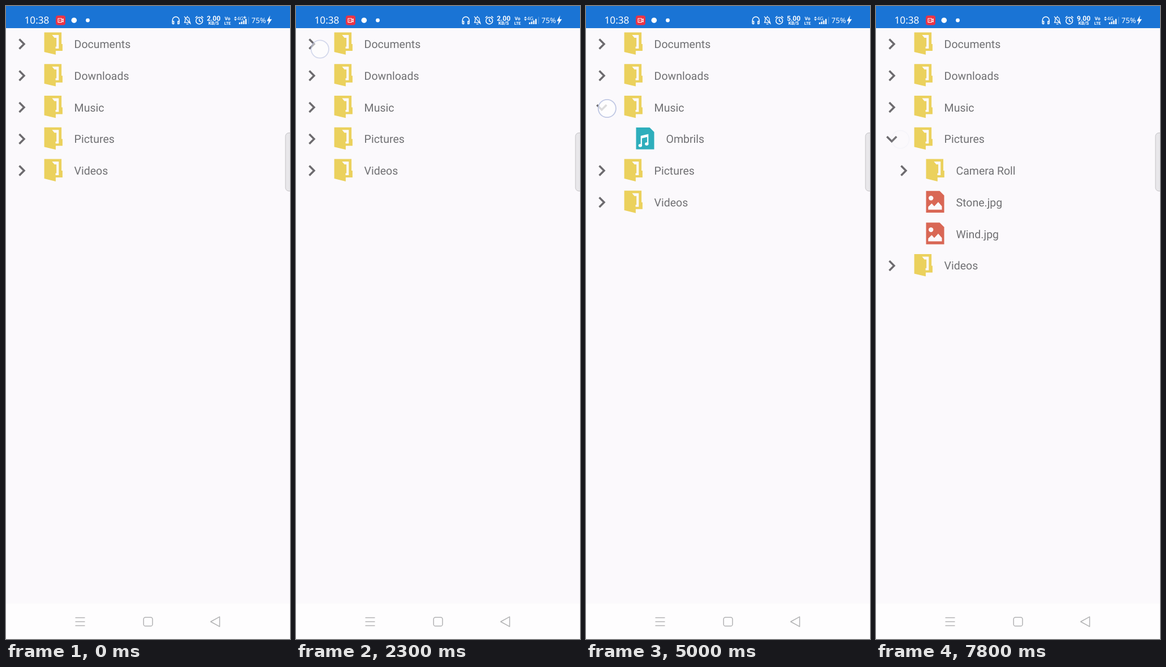
These frames come from a looping animation (502x1115 px, 8 s). An HTML page:

```html
<!DOCTYPE html>
<html lang="en">
<head>
<meta charset="utf-8">
<title>File tree</title>
<style>
  html, body { margin: 0; width: 100%; height: 100%; overflow: hidden; background: #fbf9fc; }
  svg { display: block; }
  text { font-family: Roboto, sans-serif; text-rendering: geometricPrecision; }
  .label { font-size: 19.52px; fill: #707073; }
  .bar text { fill: #fff; font-family: "Noto Sans", sans-serif; }
  .bar .small { font-family: Roboto, sans-serif; font-weight: 700; text-anchor: middle; }
  .line { fill: none; stroke: #fff; stroke-width: 1.5; stroke-linecap: round; stroke-linejoin: round; }
  .nav { fill: none; stroke: #b2b2b4; stroke-width: 1.5; stroke-linejoin: round; }
  .chevron { fill: none; stroke: #6d6b6f; stroke-width: 3.5; }
</style>
</head>
<body>
<svg width="502" height="1115" viewBox="0 0 502 1115">
  <defs>
    <g id="folder">
      <path fill="#ebd15d" d="M0-20.5H30.5V0H32.3V12H20.3V18.8L0 14Z"/>
      <path fill="#fbf9fc" d="M13.8-16H25.7V8H20V4.4H21.6V-11H18Z"/>
    </g>
    <path id="page" d="M0-20.2H24L32-12.2V18.2H0Z"/>
    <circle id="dot" cx="15.5" cy="4.5" r="7.5" fill="#fff"/>
    <g id="image" fill="#fbf9fc">
      <circle cx="8.7" cy="-7.5" r="4.2"/>
      <path d="M3.8 13V8L10 2L14.5 7L21.5-.5L28 7V13Z"/>
    </g>
    <g id="note" fill="#fff">
      <path d="M8.2-5.6L21.8-8.8V9H19.6V-3.6L10.4-1.4V12H8.2Z"/>
      <ellipse cx="7.4" cy="11.5" rx="3.2" ry="2.7"/>
      <ellipse cx="18.8" cy="8.7" rx="3.2" ry="2.7"/>
    </g>
    <path id="archive" fill="#fff" d="M13-19h3v3h-3zm3 4h3v3h-3zm-3 4h3v3h-3zm3 4h3v3h-3zm-3 4h6v9h-6z"/>
    <path id="window" fill="#fff" fill-rule="evenodd" d="M6-7H26V11H6ZM8-2V9H24V-2Z"/>
  </defs>

  <rect width="502" height="1115" fill="#fbf9fc"/>
  <g id="rows"></g>
  <circle id="touch" r="15.6" fill="#fff" fill-opacity=".76" stroke="#c0c8e4" stroke-width="1.8"/>
  <rect x="494" y="223.5" width="16" height="102.5" rx="6" fill="#e8e7ea" stroke="#c3c2c5"/>

  <g class="bar">
    <rect width="502" height="39" fill="#1a74d5"/>
    <text x="32.5" y="31.3" font-size="17.2">10:38</text>
    <rect x="88" y="16.8" width="17" height="17" rx="4" fill="#eb3446"/>
    <path class="line" style="stroke-width:1.1" d="M92 22H98.5V28.6H92ZM98.5 24.5L101.3 22.7V28L98.5 26.2M94 25.3H96"/>
    <circle cx="120.3" cy="25.2" r="4.8" fill="#fff"/>
    <circle cx="144.5" cy="25.2" r="3.4" fill="#fff"/>
    <path class="line" d="M294.2 27V25a6 6 0 0 1 12 0V27M294.2 27h2.4v4.6h-1.2a1.2 1.2 0 0 1-1.2-1.2ZM306.2 27h-2.4v4.6h1.2a1.2 1.2 0 0 0 1.2-1.2Z"/>
    <path class="line" style="stroke-width:1.3" d="M315.4 29.2H325.7L324.2 26.5V23.5a3.7 3.7 0 0 0-7.4 0V26.5ZM319.3 31.8H322M320.6 18.2V19.4M315.4 18.8L326.4 31.6"/>
    <g class="line">
      <circle cx="341.7" cy="25.9" r="5.9"/>
      <path d="M341.7 22.7V26.3L344.2 27.6M335.2 20.5L337.7 18.4M348.2 20.5L345.7 18.4"/>
    </g>
    <text id="speed" class="small" x="367" y="26" font-size="12"></text>
    <text class="small" x="367" y="33.4" font-size="8.2">KB/S</text>
    <text class="small" x="391.6" y="25" font-size="8.4">Vo</text>
    <text class="small" x="391.6" y="32.8" font-size="7.2">LTE</text>
    <path fill="#fff" d="M403.2 21.5L405.5 18.5L407.8 21.5ZM403.2 23L405.5 26L407.8 23Z"/>
    <text x="408.6" y="25.4" font-size="8.6">4G</text>
    <path id="plus" class="line" style="stroke-width:1.2" d="M419.8 20.2H424M421.9 18.1V22.3"/>
    <path fill="#fff" d="M411.8 29h2.4v3h-2.4zm3.7-1.6h2.4v4.6h-2.4zm3.7-2h2.4v6.6h-2.4zm3.7-2.6h2.4v9.2h-2.4z"/>
    <path stroke="#fff" stroke-opacity=".35" d="M428.8 19V31.5"/>
    <text x="433.8" y="30.2" font-size="13">75%</text>
    <path fill="#fff" d="M466.8 16.8L461 26.4H464.5L462.8 33.4L470 23.3H465.8Z"/>
  </g>

  <rect y="1052.5" width="502" height="63" fill="#fefdfe"/>
  <g class="nav">
    <path d="M122.5 1077.5H139.5M122.5 1084.5H139.5M122.5 1091.5H139.5"/>
    <rect x="243.2" y="1076.7" width="15.8" height="15.6" rx="3.4"/>
    <path d="M361.8 1084.5L377.6 1075.8V1093.2Z"/>
  </g>
</svg>

<script>
const ROW = 55.77, TOP = 67, INDENT = 20.9, LOOP = 8000;
const $ = id => document.getElementById(id);

const KINDS = {
  docx: ['#3352a6', 'dot'],
  ppt: ['#ce3e27', 'dot'],
  pdf: ['#ea4939', 'dot'],
  jpg: ['#d96755', 'image'],
  song: ['#2eaebc', 'note'],
  zip: ['#8b78b6', 'archive'],
  '7z': ['#8b78b6', 'archive'],
  exe: ['#4b8fc4', 'window']
};

const TREE = [
  ['Documents', ['Environmental Pollution.docx', 'Global Warming.ppt', 'Sanitation.docx', 'Social Network.pdf', 'Youth Empowerment.pdf']],
  ['Downloads', ['UI-Guide.pdf', 'Tutorials.zip', 'Game.exe', 'TypeScript.7z']],
  ['Music', ['Ombrils']],
  ['Pictures', ['Camera Roll', 'Stone.jpg', 'Wind.jpg']],
  ['Videos', []]
];

// press, toggle, start of fade, end of fade, folder, x, y
const TAPS = [
  [1000, 1100, 1200, 1400, 0, 41, 71],
  [2000, 2200, 2200, 2500, 0, 42.3, 76],
  [2800, 3000, 3100, 3300, 1, 42, 128],
  [3500, 3700, 3700, 3900, 1, 44.5, 130.5],
  [4300, 4500, 4600, 4800, 2, 39, 181],
  [5000, 5200, 5200, 5400, 2, 37.3, 180.5],
  [5700, 5800, 5800, 6000, 3, 39.5, 233],
  [6300, 6500, 6600, 6800, 3, 41, 234],
  [7400, 7600, 7600, 7820, 3, 43, 235]
];
const SPEEDS = [[0, '2.00'], [2900, '5.00'], [6500, '9.00']];
const SIGNAL = [[0, true], [2000, false], [3000, true], [4500, false], [5600, true], [7000, false]];

const RIGHT = 'M-4.3-8.5L4.2 0L-4.3 8.5';
const DOWN = 'M-8.5-4.3L0 4.2L8.5-4.3';

const valueAt = (steps, t) => steps.filter(s => s[0] <= t).pop()[1];

function icon(name, isFolder) {
  if (isFolder) return '<use href="#folder"/>';
  const [color, mark] = KINDS[name.includes('.') ? name.split('.').pop() : 'song'];
  return `<use href="#page" fill="${color}"/><use href="#${mark}"/>`;
}

function addRow(name, depth, isFolder) {
  const g = document.createElementNS('http://www.w3.org/2000/svg', 'g');
  const x = depth * INDENT;
  g.innerHTML = (isFolder ? `<path class="chevron" transform="translate(${27.8 + x})" d="${RIGHT}"/>` : '') +
    `<g transform="translate(${67.6 + x})">${icon(name, isFolder)}</g>` +
    `<text class="label" x="${120.6 + x}" y="7">${name}</text>`;
  $('rows').append(g);
  return g;
}

const folders = TREE.map(([name, files]) => {
  const row = addRow(name, 0, true);
  return {
    row,
    chevron: row.querySelector('.chevron'),
    children: files.map(f => addRow(f, 1, f === 'Camera Roll'))
  };
});

function draw(t) {
  const open = folders.map(() => false);
  let touch = null;
  for (const tap of TAPS) {
    if (t >= tap[1]) open[tap[4]] = !open[tap[4]];
    if (t >= tap[0] && t < tap[3]) touch = tap;
  }

  let line = 0;
  const place = row => row.setAttribute('transform', `translate(0 ${TOP + ROW * line++})`);
  folders.forEach((f, i) => {
    place(f.row);
    f.chevron.setAttribute('d', open[i] ? DOWN : RIGHT);
    for (const child of f.children) {
      child.style.display = open[i] ? '' : 'none';
      if (open[i]) place(child);
    }
  });

  let alpha = 0;
  if (touch) {
    const [, , fade, end, , x, y] = touch;
    alpha = Math.min(1, (end - t) / (end - fade));
    $('touch').setAttribute('cx', x);
    $('touch').setAttribute('cy', y);
  }
  $('touch').setAttribute('opacity', alpha);

  $('speed').textContent = valueAt(SPEEDS, t);
  $('plus').style.display = valueAt(SIGNAL, t) ? '' : 'none';
}

// The picture advances in steps of 100 ms and rests at the end of the loop.
let last = -1;
function tick() {
  const t = Math.min(7800, Math.floor(performance.now() % LOOP / 100) * 100);
  if (t !== last) draw(last = t);
  requestAnimationFrame(tick);
}
tick();
</script>
</body>
</html>
```
